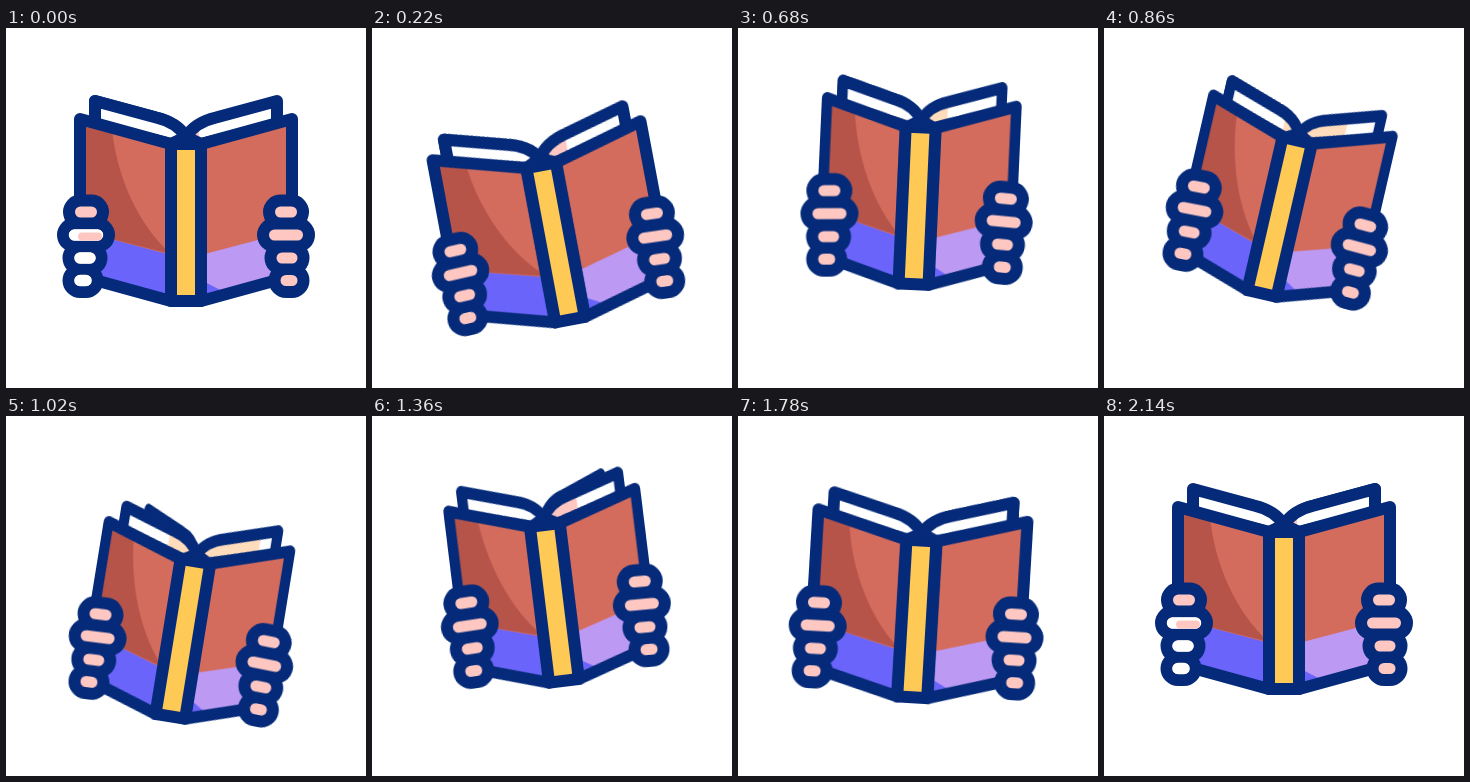
Write an HTML page that moves like this. It is 360 by 360 pixels and loops after 2400 ms.

```html
<!DOCTYPE html>
<html lang="en">
<head>
<meta charset="utf-8">
<title>Reading a book</title>
<style>
  html, body { margin: 0; width: 100%; height: 100%; overflow: hidden; background: #fff; }
  svg { display: block; width: 100vw; height: 100vh; }

  .line { stroke: #052a79; stroke-width: 12; stroke-linecap: round; stroke-linejoin: round; }
  .line, .line * { vector-effect: non-scaling-stroke; }
  .page { fill: #fff; }
  .none { fill: none; }
  .cap { fill: none; stroke-linecap: round; }
  .skin { stroke: #ffc7c2; stroke-width: 11; }
  .pale { stroke: #fff; stroke-width: 11.5; }

  .bob, .tilt, .fold, .grip, .leaf, .tint, .glint {
    animation: 2400ms ease-in-out infinite;
  }
  .bob { animation-name: bob; }
  .tilt { animation-name: tilt; transform-origin: 180px 175px; }
  .fold { animation-name: fold; transform-origin: 180px 108px; }
  .wing { transform-origin: 165px 108px; }
  .grip { animation-name: grip, flex; transform-origin: 80px 190px; }
  .leaf { animation-name: leaf; transform-origin: 180px 108px; }
  .tint { transform-origin: 180px 108px; fill: #ffc7c2; }
  .near { animation-name: near; }
  .far { animation-name: far; fill: #ffdcbc; }
  .glint { animation-name: glint; animation-timing-function: step-end; }

  @keyframes bob {
    0%, 89.17%, 100% { transform: translateY(0); }
    15.21% { transform: translateY(30px); }
    31.25% { transform: translateY(-20px); }
    43.33% { transform: translateY(29px); }
    57.08% { transform: translateY(-7.5px); }
    73.33% { transform: translateY(8.5px); }
  }
  @keyframes tilt {
    0%, 89.17%, 100% { transform: rotate(0deg); }
    16.67% { transform: rotate(-18deg); }
    36.25% { transform: rotate(13deg); }
    57.08% { transform: rotate(-7deg); }
    74.17% { transform: rotate(3.4deg); }
  }
  @keyframes fold {
    0%, 6.25%, 81.25%, 100% { transform: scaleX(1); }
    38.33%, 47.92% { transform: scaleX(.845); }
  }
  @keyframes grip {
    0%, 6.25%, 81.25%, 100% { transform: translateX(0); }
    38.33%, 47.92% { transform: translateX(15px); }
  }
  @keyframes flex {
    0%, 81.25%, 100% { rotate: 0deg; }
    16.67% { rotate: -4deg; }
    38.33%, 47.92% { rotate: -2deg; }
  }
  @keyframes leaf {
    0%, 36.67% { transform: scale(1, 1); animation-timing-function: ease-in; }
    49.17% { transform: scale(0, 1.05); animation-timing-function: ease-out; }
    61.67%, 100% { transform: scale(-1, 1); }
  }
  @keyframes near {
    0%, 89.17%, 100% { transform: scaleX(.13); fill: #ffc7c2; }
    17.5% { transform: scaleX(.42); fill: #ffc7c2; }
    28.33% { transform: scaleX(.3); fill: #ffdcbc; }
    42.5% { transform: scaleX(.72); fill: #ffdcbc; }
    56.67% { transform: scaleX(.4); fill: #ffc7c2; }
    74.17% { transform: scaleX(0); fill: #ffc7c2; }
  }
  @keyframes far {
    0%, 28.33%, 54%, 100% { transform: scaleX(0); }
    42.5% { transform: scaleX(.35); }
  }
  @keyframes glint {
    0% { opacity: 1; }
    2.5% { opacity: 0; }
    85.83%, 100% { opacity: 1; }
  }
</style>
</head>
<body>
<svg viewBox="0 0 360 360">
  <defs>
    <path id="sheet" d="M89 97V73L150 89.500C165 93 174 99 180 109L165 116Z"/>
    <path id="cover" d="M74 91L165 116V273L74 248Z"/>
    <path id="band" d="M74 203L165 227V273L74 248Z"/>
    <path id="fingers" d="M74.500 184H85.500M68.500 207H91.500M74 230H84M74 252.500H80"/>
    <clipPath id="inside"><use href="#sheet"/></clipPath>
    <g id="hand" class="cap">
      <use href="#fingers" stroke="#052a79" stroke-width="35"/>
      <use href="#fingers" class="skin"/>
    </g>
  </defs>

  <g class="bob"><g class="tilt">
    <!-- pages -->
    <g class="fold">
      <g class="leaf line page"><use href="#sheet"/></g>
      <use href="#sheet" class="page"/>
      <g clip-path="url(#inside)"><rect class="tint far" x="80" y="60" width="100" height="60"/></g>
      <g class="line none"><use href="#sheet"/></g>
    </g>
    <g transform="translate(360 0) scale(-1 1)"><g class="fold">
      <use href="#sheet" class="page"/>
      <g clip-path="url(#inside)"><rect class="tint near" x="80" y="60" width="100" height="60"/></g>
      <g class="line none"><use href="#sheet"/></g>
    </g></g>

    <!-- covers -->
    <g class="fold wing">
      <use href="#cover" fill="#d46c5e"/>
      <path d="M74 91L106 100C110 148 133 198 165 226L74 203Z" fill="#b6544a"/>
      <use href="#band" fill="#6b64fa"/>
      <g class="line none"><use href="#cover"/></g>
    </g>
    <g transform="translate(360 0) scale(-1 1)"><g class="fold wing">
      <use href="#cover" fill="#d46c5e"/>
      <use href="#band" fill="#bc99f2"/>
      <path d="M165 252L138 266L165 273Z" fill="#6b64fa"/>
      <g class="line none"><use href="#cover"/></g>
    </g></g>
    <rect class="line" x="165" y="116" width="30" height="157" fill="#ffc955"/>

    <!-- hands -->
    <g class="grip">
      <use href="#hand"/>
      <g class="glint cap">
        <path class="pale" d="M68.500 207H91.500M74 230H84M74 252.500H80"/>
        <path d="M76 208.500H92" stroke="#ffc7c2" stroke-width="8"/>
      </g>
    </g>
    <g transform="translate(360 0) scale(-1 1)"><g class="grip"><use href="#hand"/></g></g>
  </g></g>
</svg>
</body>
</html>
```
